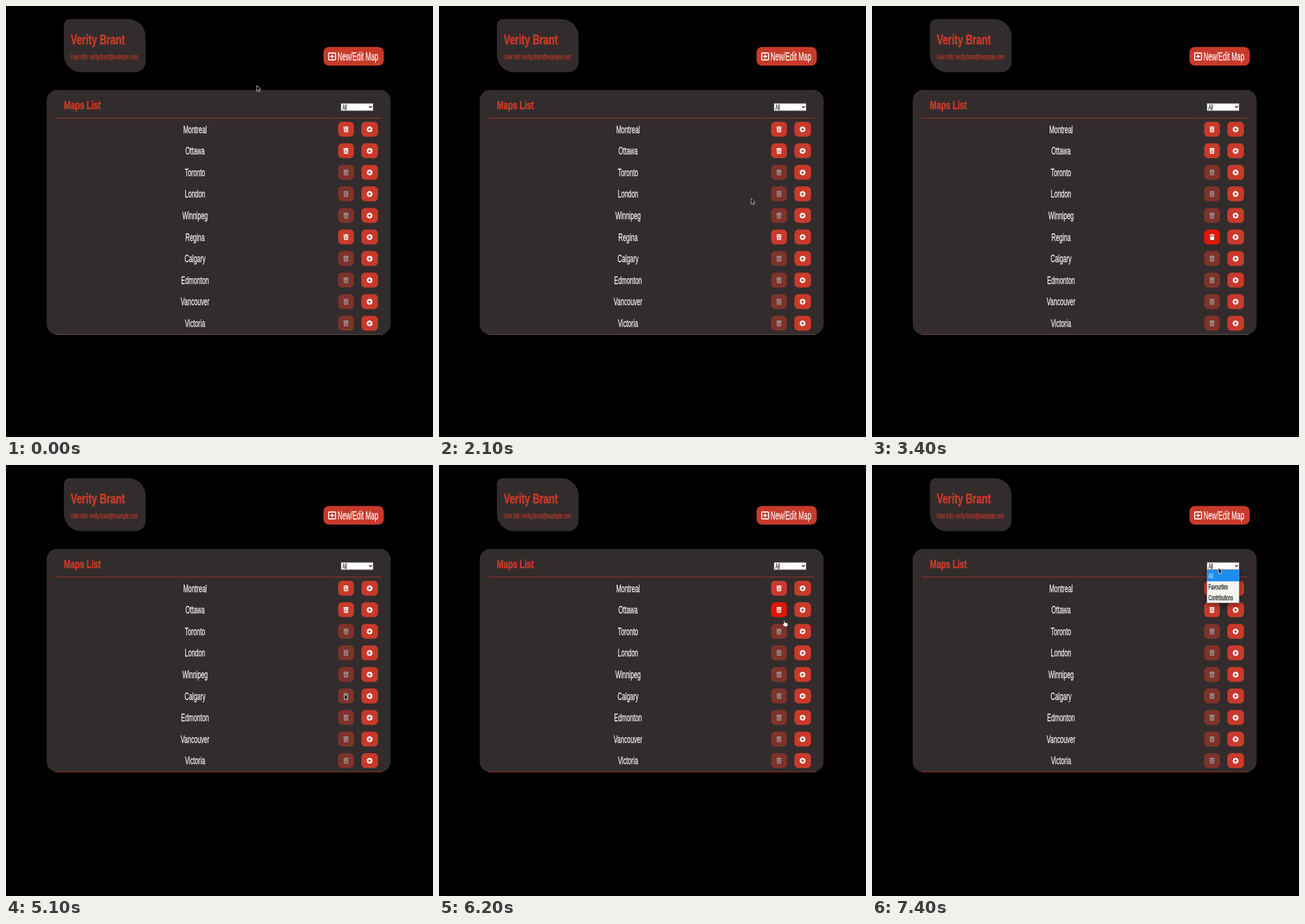
Recreate the animation shown at these times as an HTML page. Size 745x752 px, loop 8000 ms.

```html
<!DOCTYPE html>
<html lang="en">
<head>
<meta charset="utf-8">
<title>Maps List</title>
<style>
  html, body { margin: 0; width: 100%; height: 100%; overflow: hidden; background: #000; }
  svg { display: block; width: 745px; height: 752px; cursor: default; }
  text { font-family: "Liberation Sans", Arial, sans-serif; stroke-width: .25px; }
  .panel { fill: #332c2c; }
  .red { fill: #c83a2b; }
  .white { fill: #fff; stroke: #fff; }
  .accent { fill: #c83a2b; stroke: #c83a2b; }
  .dark { fill: #111; stroke: #111; }
  .pale { fill: #cfe4fb; stroke: #cfe4fb; }
  .bold { font-weight: 700; stroke-width: .7px; }
  .rule { stroke: #a8382d; stroke-width: 1; }
  .off { opacity: .5; }
  .hover .trash { fill: #e01607; }
  .hover .slits { stroke: #e01607; }
  .slits { stroke: #c83a2b; stroke-width: .8; }
</style>
</head>
<body>
<svg id="stage" viewBox="0 0 745 752"></svg>
<script>
const NS = "http://www.w3.org/2000/svg";
const LOOP = 8000, ROW = 37.6, FIRST = 215;
const DELETED = 5, DELETE_AT = 5100, MENU_AT = 7400;
const CONDENSED = 0.56, CONDENSED_BOLD = 0.7;
const cities = ["Montreal", "Ottawa", "Toronto", "London", "Winnipeg",
  "Regina", "Calgary", "Edmonton", "Vancouver", "Victoria"];
const owned = [0, 1, 5];

// time, x, y, shape
const path = [
  [0, 437, 138], [700, 436, 142], [800, 436, 150], [900, 437, 155],
  [1100, 458, 184], [1200, 490, 237], [1300, 502, 261], [1400, 506, 268],
  [1600, 512, 280], [1700, 523, 302], [1800, 531, 316], [1900, 535, 323],
  [2100, 544, 335], [2200, 553, 350], [2300, 562, 364], [2400, 571, 377],
  [2500, 578, 386], [2600, 582, 391, "hand"], [2700, 584, 393, "hand"],
  [2900, 585, 395, "hand"], [3000, 586, 396, "hand"], [3200, 587, 397, "hand"],
  [3400, 588, 398, "hand"], [5100, 590, 399], [5700, 589, 399], [5800, 588, 398],
  [6000, 594, 352], [6100, 599, 306], [6200, 599, 271, "hand"],
  [6300, 599.5, 246, "hand"], [6500, 600, 213, "hand"],
  [6700, 602, 192], [6800, 604, 183], [6900, 604, 179]
];
// from, to, row
const hovers = [[2600, 5100, 5], [6200, 6300, 1], [6500, 6700, 0]];

const stage = document.getElementById("stage");

function add(parent, tag, attrs) {
  const el = document.createElementNS(NS, tag);
  for (const k in attrs) el.setAttribute(k, attrs[k]);
  return parent.appendChild(el);
}
const group = (parent, cls = "") => add(parent, "g", { class: cls });
const shape = (parent, d, attrs) => add(parent, "path", { d, ...attrs });
const box = (parent, x, y, width, height, rx, attrs) =>
  add(parent, "rect", { x, y, width, height, rx, ...attrs });

function label(parent, str, x, y, size, cls, anchor = "start") {
  const sx = cls.includes("bold") ? CONDENSED_BOLD : CONDENSED;
  const el = add(parent, "text", {
    class: cls, "font-size": size, "text-anchor": anchor,
    transform: `translate(${x} ${y}) scale(${sx} 1)`
  });
  el.textContent = str;
}

function place(el, x, y) {
  el.setAttribute("transform", `translate(${x} ${y})`);
}

function show(el, on) {
  el.style.display = on ? "" : "none";
}

function header() {
  shape(stage, "M111 23H213.5A30 30 0 0 1 243.5 53V97.5A18 18 0 0 1 225.5 115.5H131A30 30 0 0 1 101 85.5V33A10 10 0 0 1 111 23Z", { class: "panel" });
  label(stage, "Verity Brant", 113, 67, 24, "accent bold");
  label(stage, "User info: verity.brant@example.com", 113, 93, 12.8, "accent");
  box(stage, 554, 71.5, 105, 32.5, 9, { class: "red" });
  box(stage, 563, 82, 12, 12, 1, { fill: "none", stroke: "#fff", "stroke-width": 1.8 });
  shape(stage, "M569 84.5V91.5M565.5 88H572.5", { stroke: "#fff", "stroke-width": 1.8 });
  label(stage, "New/Edit Map", 578.5, 95, 20.4, "white");
}

function listHead() {
  label(stage, "Maps List", 101, 180, 20, "accent bold");
  shape(stage, "M87 195.5H572.5M573.5 195.5H613.5M614.5 195.5H655", { class: "rule" });
  box(stage, 584.5, 170, 56, 12.8, 0, { fill: "#fff", stroke: "#767676" });
  label(stage, "All", 587, 180.5, 12.5, "dark");
  shape(stage, "M633.5 174.7L636 177.2L638.5 174.7", { fill: "none", stroke: "#111", "stroke-width": 1.4 });
}

function makeRow(city, i) {
  const row = group(stage);
  label(row, city, 329.8, 6.5, 19, "white", "middle");
  const del = group(row, owned.includes(i) ? "" : "off");
  box(del, 579.5, -13, 27.5, 26, 7, { class: "red trash" });
  const icon = group(del);
  place(icon, 593.2, 0.3);
  shape(icon, "M-4.5 -4.6H-1.5V-5.4H1.5V-4.6H4.5V-3H-4.5ZM-3.9 -2.4H3.9L3.4 5H-3.4Z", { fill: "#fff" });
  shape(icon, "M-1.7 -1V3.8M0 -1V3.8M1.7 -1V3.8", { class: "slits" });
  box(row, 620, -13, 29, 26, 7, { class: "red" });
  add(row, "circle", { cx: 634.4, cy: 0.3, r: 5, fill: "#fff" });
  shape(row, "M634.4 -2.5V3.1M631.6 .3H637.2", { stroke: "#c83a2b", "stroke-width": 1.5 });
  return row;
}

function makeMenu() {
  const menu = group(stage);
  menu.style.filter = "drop-shadow(0 4px 4px rgba(0,0,0,.35))";
  box(menu, 584, 183, 57, 58, 0, { fill: "#f5f5f2" });
  box(menu, 584, 183, 57, 20, 0, { fill: "#1e8df2" });
  shape(menu, "M584.5 183V240.5H640.5V183", { fill: "none", stroke: "#777", "stroke-width": .7 });
  ["All", "Favourites", "Contributions"].forEach((item, i) =>
    label(menu, item, 587, 198 + i * 19, 13, i ? "dark" : "pale"));
  return menu;
}

function makeCursors() {
  const arrow = shape(stage, "M.5 .5V10.5L2.9 8.4L4.5 11.9L6 11.2L4.5 7.8H7.5Z",
    { fill: "#000", stroke: "#eee", "stroke-width": .8, "stroke-linejoin": "round" });
  const hand = shape(stage, "M2.2 .9Q3.1 0 3.9 1L4.4 3.9L8.8 4.7Q10 5.2 9.7 6.7L9 10.8H3.4L.4 7Q.2 5.9 1.3 6L2.8 6.8Z",
    { fill: "#fff", stroke: "#111", "stroke-width": .6 });
  return { arrow, hand };
}

header();
const panel = box(stage, 71, 146.5, 600, 427, 18, { class: "panel" });
listHead();
const rows = cities.map(makeRow);
const foot = shape(stage, "M86 0H657", { class: "rule" });
const menu = makeMenu();
const cursors = makeCursors();

function render(t) {
  const gone = t >= DELETE_AT;
  const hover = hovers.find(([from, to]) => t >= from && t < to);
  rows.forEach((row, i) => {
    const slot = gone && i > DELETED ? i - 1 : i;
    place(row, 0, FIRST + slot * ROW);
    show(row, !(gone && i === DELETED));
    row.setAttribute("class", hover && hover[2] === i ? "hover" : "");
  });
  const bottom = gone ? 535.5 : 573.3;
  panel.setAttribute("height", bottom - 146.5);
  place(foot, 0, bottom);
  foot.style.stroke = gone ? "#a8382d" : "#6e5652";
  show(menu, t >= MENU_AT);

  let step = path[0];
  for (const p of path) if (t >= p[0]) step = p;
  const [, x, y, kind = "arrow"] = step;
  for (const name in cursors) show(cursors[name], name === kind);
  place(cursors[kind], x, y);
}

const start = performance.now();
function tick() {
  render((performance.now() - start) % LOOP);
  requestAnimationFrame(tick);
}
tick();
</script>
</body>
</html>
```
